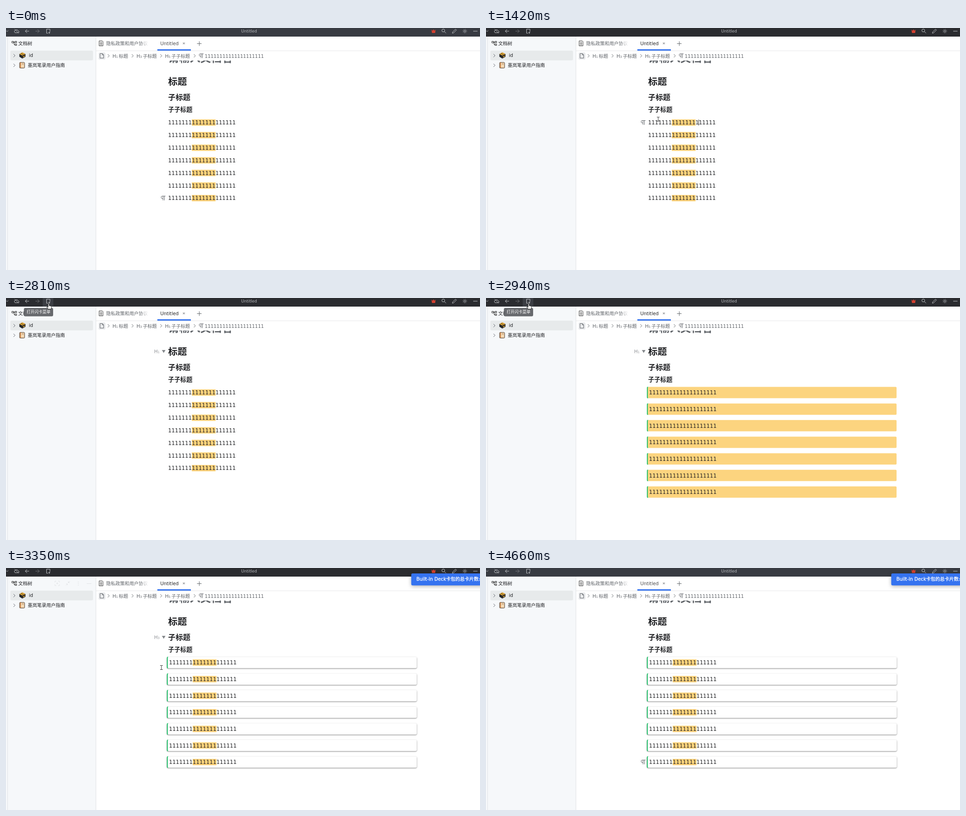
Write an HTML page that moves like this. It is 1046 px wide and 535 px high and loops after 4.73 s.

```html
<!DOCTYPE html>
<html lang="zh-CN">
<head>
<meta charset="utf-8">
<title>Untitled</title>
<style>
  html, body { margin: 0; height: 100%; overflow: hidden; background: #fff; }
  svg { display: block; width: 1046px; height: 535px; }
  text { font: 10.25px "DejaVu Sans", "Noto Sans CJK SC", "Noto Sans CJK", sans-serif; fill: #202124; white-space: pre; }
  .line { fill: none; stroke: #5f6368; }
  .bar .line { stroke: #c4c6c9; }
  .bar text { font-size: 8.8px; fill: #b9bbbe; }
  .soft text, text.soft { fill: #5f6368; }
  .head text { font-weight: 700; }
  .row text { font-size: 11.73px; }
  .mark text { fill: #8a8d91; }
  .mark .line { stroke: #7d8084; }
  .card { fill: #fff; filter: drop-shadow(.6px 1px 1px rgba(0,0,0,.5)); }
  .dots { stroke: #5f6368; stroke-width: 1.5; stroke-dasharray: 1.5 2; }
  #toast rect { fill: #3573f0; filter: drop-shadow(0 2px 4px rgba(0,0,0,.3)); }
  #toast text, #tip text { fill: #fff; }
  #toast text { stroke: #fff; stroke-width: .3; }
  #tip text { font-size: 8.8px; }
</style>
</head>
<body>
<svg viewBox="0 0 1046 535">
  <defs>
    <path id="chev" class="line" d="M-2-3.5L1.5 0L-2 3.5"/>
    <path id="para" class="line" d="M11-4.5H4a2.7 2.7 0 0 0 0 5.4H5.5M5.5-4.5V5M8.5-4.5V5"/>
    <linearGradient id="fade"><stop stop-color="#fff" stop-opacity="0"/><stop offset="1" stop-color="#fff"/></linearGradient>
    <clipPath id="below"><path d="M340 72H900V100H340Z"/></clipPath>
  </defs>

  <!-- side panel -->
  <path fill="#f6f8fa" d="M0 18H198V535H0Z"/>
  <path class="line" style="stroke:#e0e2e5" d="M3.5 18V535M198.5 18V535"/>
  <path class="line" style="stroke:#222" d="M13 29.5h3.5v3.5h-3.5zM20 29.5h3.5v3h-3.5zM20 35.5h3.5v3h-3.5zM16.5 31H20M18 31V37H20"/>
  <text x="27" y="38">文档树</text>
  <rect x="9.5" y="50" width="182.5" height="21.5" rx="3" fill="#e7eaeb"/>
  <rect id="hover2" x="9.5" y="71.5" width="182.5" height="21.5" rx="3" fill="#eceff0"/>
  <use href="#chev" x="18.5" y="61"/><use href="#chev" x="18.5" y="82.5"/>
  <path fill="#25282c" d="M29.5 57.5L36 54l7 3.5v6L36 67.5l-6.5-4z"/>
  <path fill="#e9a92f" d="M29.5 57.5L36 54l7 3.5L36.5 61zM37.5 63l4-2v2l-4 2z"/>
  <path stroke="#25282c" d="M33 56l6.5 3.5"/>
  <text x="50.5" y="64">id</text>
  <rect x="30" y="76" width="11" height="12.5" rx="1.5" fill="#f3d9b5" stroke="#3b2a20"/>
  <path d="M32 76V88.5" stroke="#c9702b" stroke-width="1.5"/>
  <path d="M35 79.5h4" stroke="#9a6a3c"/>
  <text x="48" y="86">墨岚笔录用户指南</text>
  <g id="tools">
    <path class="line" d="M108 32v-3h3M115 29h3v3M118 36v3h-3M111 39h-3v-3M111 34h4M113 32v4M132 38.5l3.5-3.5M132.500 35h3v3M141 29l-3.5 3.5M137.500 29.500v3h3M178 34.500h10.500"/>
    <path class="dots" d="M159.500 30v8.500"/>
  </g>
  <g id="rowTools">
    <path class="dots" d="M162 57v8.5"/>
    <path class="line" d="M176 60.500h10M181 55.500v10"/>
  </g>

  <!-- tabs and breadcrumb -->
  <path class="line" style="stroke:#e6e7e9" d="M199 50.5H1046"/>
  <path class="line" style="stroke:#333" d="M205.5 28.5h7l1.5 1.5v9.500h-8.500zM207.500 32h4.500M207.500 34.500h4.500M207.500 37h4.500"/>
  <text class="soft" x="221" y="37.5">隐私政策和用户协议</text>
  <path fill="url(#fade)" d="M296 24H314V46H296Z"/>
  <text id="tab" x="340.5" y="37.5">Untitled</text>
  <path class="line" d="M390.500 32l4 4M394.500 32l-4 4M421.500 34.500h10M426.500 29.500v10"/>
  <path fill="#3573f0" d="M334 47H408V50H334Z"/>
  <rect x="204" y="54" width="15.5" height="16" rx="3" fill="#e9eaec"/>
  <path class="line" d="M207.500 56.500h5.500l2.500 2.500v7.500h-8zM212.500 56.500v3h3"/>
  <g id="crumbs" class="soft"></g>

  <!-- document -->
  <g class="head">
    <g clip-path="url(#below)"><text class="soft" x="358" y="75" style="font-size:23.6px">请输入文档名</text></g>
    <text x="357.8" y="125.5" style="font-size:20.7px">标题</text>
    <text x="357.8" y="159" style="font-size:16.4px">子标题</text>
    <text x="357.8" y="185" style="font-size:13.4px">子子标题</text>
  </g>
  <g id="rows"></g>
  <path id="caret" d="M469.500 202.500V215.500" stroke="#222"/>
  <g id="rowMark" class="mark"><use href="#para" x="341"/></g>
  <g id="headMark" class="mark">
    <text x="327" y="4">H<tspan id="level" font-size="6.5">1</tspan></text>
    <path fill="#85888c" d="M344-3h8l-4 6.5z"/>
  </g>

  <!-- title bar -->
  <path fill="#383b42" d="M0 0H1046V19H0Z"/>
  <path id="dark" fill="#2b2c30" d="M0 0H1046V19H0Z"/>
  <path id="iconBg" fill="#3b3d43" d="M81 0H104.500V19H81Z"/>
  <g class="bar">
    <path class="line" d="M0 5.5l2.5 2.5 2.5-2.5M20 10.500h6.500a2 2 0 0 0 .5-4a4 4 0 0 0-6.500-1.500a3 3 0 0 0-.5 5.500M19 2.500l9 9M51 7H42.500M46.500 3L42.500 7l4 4M92.500 11.500h-3v-9h7.500v6M93.500 10.500h4M95.500 8.500v4"/>
    <path class="line" opacity=".45" d="M65 7h8.500M69.500 3l4 4-4 4"/>
    <text x="519" y="10">Untitled</text>
    <path fill="#d4402f" d="M939 3.500l2.300 2.500L943.500 3l2.200 3L948 3.500 947 11h-7z"/>
    <circle class="line" cx="965" cy="5.500" r="3.200"/>
    <path class="line" d="M967.500 8l3.500 3.500M985 11.500l.5-2.500 6.500-6.500 2 2-6.500 6.500zM1031 7h9.500"/>
    <circle class="line" cx="1012.500" cy="7" r="2"/>
    <circle class="line" cx="1012.500" cy="7" r="4.200" stroke-dasharray="1.200 2.100"/>
  </g>
  <g id="tip" fill="#67696d">
    <path d="M89 22.500L93 18.500l4 4z"/>
    <rect x="39.500" y="22" width="64.500" height="18.500" rx="3"/>
    <text x="45.300" y="34">打开闪卡菜单</text>
  </g>
  <g id="toast">
    <rect y="12" width="220" height="26.500" rx="3"/>
    <text x="11.500" y="28">Built-in Deck卡包的总卡片数: 7</text>
  </g>

  <g id="pointer">
    <path id="beam" fill="none" stroke="#333" d="M-3-4.500h2.500L0-4 .5-4.500H3M0-4.500V4.500M-3 4.500H3"/>
    <path id="arrow" fill="#fff" stroke="#222" stroke-width=".9" d="M0 0V10.500L2.500 8.300 4.200 12 6 11.200 4.400 7.600H7.600Z"/>
    <path id="hand" fill="#fff" stroke="#222" stroke-width=".9" d="M-1 1a1.100 1.100 0 0 1 2.200 0V5L5.500 6q1 .3.800 1.700L5.500 12.500H-.5L-4 8.200q.3-1.500 1.700-.7L-1 8.500Z"/>
  </g>
</svg>
<script>
const $ = id => document.getElementById(id);
const LOOP = 4730, TICK = 65, TOP = 209;

// the screen refreshes about every TICK ms inside these spans and rests between them
const SPANS = [[0, 0], [200, 200], [370, 800], [1130, 1600], [1670, 2190], [2330, 2670],
  [2810, 2940], [3090, 3610], [3670, 4130], [4590, 4660]];

// pointer strokes: span, end point, ease power, optional bend point
const HOME = [685, 382];
const STROKES = [
  { span: [310, 800], to: [464, 216], pow: 1 },
  { span: [1130, 1735], to: [98, 57], pow: 1, bend: [440, 250] },
  { span: [1850, 2330], to: [94, 12], pow: 1 },
  { span: [3090, 3350], to: [343, 220], pow: 1.65 },
  { span: [3350, 4130], to: [1000, 540], pow: 1, bend: [360, 530] },
];

const clamp = (v, lo, hi) => Math.max(lo, Math.min(hi, v));
const ramp = (t, from, to) => clamp((t - from) / (to - from), 0, 1);
const show = (el, on) => el.style.display = on ? '' : 'none';
const move = (el, x, y) => el.setAttribute('transform', `translate(${x} ${y})`);

function snap(t) {
  const [from, to] = SPANS.findLast(s => s[0] <= t);
  const steps = Math.max(1, Math.round((to - from) / TICK));
  return from + (to - from) / steps * Math.floor(ramp(t, from, to || 1) * steps + .001);
}

function pointerAt(t) {
  let at = HOME;
  for (const { span, to, pow, bend } of STROKES) {
    const p = ramp(t, ...span) ** pow;
    at = at.map((a, i) => {
      const mid = bend ? bend[i] : (a + to[i]) / 2;
      return a * (1 - p) ** 2 + 2 * mid * p * (1 - p) + to[i] * p * p;
    });
  }
  return at;
}

$('crumbs').innerHTML = [[235, 1, '标题'], [288, 3, '子标题'], [351, 5, '子子标题']].map(([x, level, name]) =>
  `<use href="#chev" x="${x - 8.5}" y="61.5"/>
  <text x="${x}" y="65.5">H<tspan font-size="6.5">${level}</tspan></text><text x="${x + 14}" y="65.5">${name}</text>`
).join('') + `<use href="#chev" x="416.5" y="61.5"/><use href="#para" x="425" y="61.5"/>
  <text x="438.5" y="65.5">${'1'.repeat(20)}</text>`;

$('rows').innerHTML = `<g class="row">
  <g><rect class="card" x="355" y="-12.5" width="551.5" height="25" rx="3"/>
  <rect class="band" y="-12.5" height="25" rx="2" fill="#fcd47f"/>
  <path fill="none" stroke="#26c06c" stroke-width="2" d="M357.5-12q-1.5 0-1.5 2v20q0 2 1.5 2"/></g>
  <g><rect x="410" y="-7" width="52.5" height="14" fill="#fcd27a"/>
  <text x="357.8" y="4.3">${'1'.repeat(20)}</text></g></g>`.repeat(7);
const rows = [...$('rows').children];

function drawRow(row, y, t, cards) {
  const [box, line] = row.children, [card, band] = box.children;
  move(row, 0, y);
  move(line, cards ? 2 : 0, 0);
  show(box, cards);
  // a yellow band enters from the left, then leaves to the right
  const left = ramp(t, 3070, 3295), right = ramp(t, 2715, 2940);
  show(card, left === 1);
  band.setAttribute('x', 357 + 549 * left);
  band.setAttribute('width', 549 * Math.max(0, right - left));
}

function draw(time) {
  const t = snap(time), [x, y] = pointerAt(t);
  const cards = t > 2870, gap = cards ? 36.67 : 27.85;
  // the first row runs one screen refresh ahead
  rows.forEach((row, i) => drawRow(row, TOP + i * gap, i ? t : t + 17, cards));

  const onHead = t > 1450 && t < 3400, h3 = t > 3270;
  show($('headMark'), onHead);
  show($('rowMark'), !onHead);
  $('level').textContent = h3 ? 3 : 1;
  move($('headMark'), 0, h3 ? 153 : 118);
  move($('rowMark'), 0, TOP + gap * clamp(Math.round((y - TOP) / gap), 0, 6));
  show($('caret'), t > 1190 && t < 1840 || t > 2320 && t < 2660);

  const inSide = x < 198, inRow = inSide && y > 49 && y < 72, inRow2 = inSide && y >= 72 && y < 93;
  const beam = !inSide && y > 70, hand = inRow || inRow2 || y < 19;
  show($('pointer'), t >= 200 && t < 4130);
  move($('pointer'), x, y);
  show($('beam'), beam);
  show($('hand'), hand);
  show($('arrow'), !beam && !hand);
  show($('rowTools'), inRow);
  show($('hover2'), inRow2);
  $('tools').style.opacity = ramp(t, 1465, 1670) - ramp(t, 2330, 2540) + .4 * (ramp(t, 3155, 3220) - ramp(t, 3220, 3415));

  const focus = ramp(t, 1070, 1200) - ramp(t, 4520, 4660);
  $('dark').style.opacity = focus;
  $('tab').style.opacity = .82 + .18 * focus;
  show($('iconBg'), t > 2320 && t < 3200);
  show($('tip'), t > 2520 && t < 3200);
  show($('toast'), t > 3080);
  move($('toast'), 894.3 + 152 * Math.exp((3090 - t) / 25), 0);
}

const start = performance.now();
function frame() {
  draw((performance.now() - start) % LOOP);
  requestAnimationFrame(frame);
}
frame();
</script>
</body>
</html>
```
